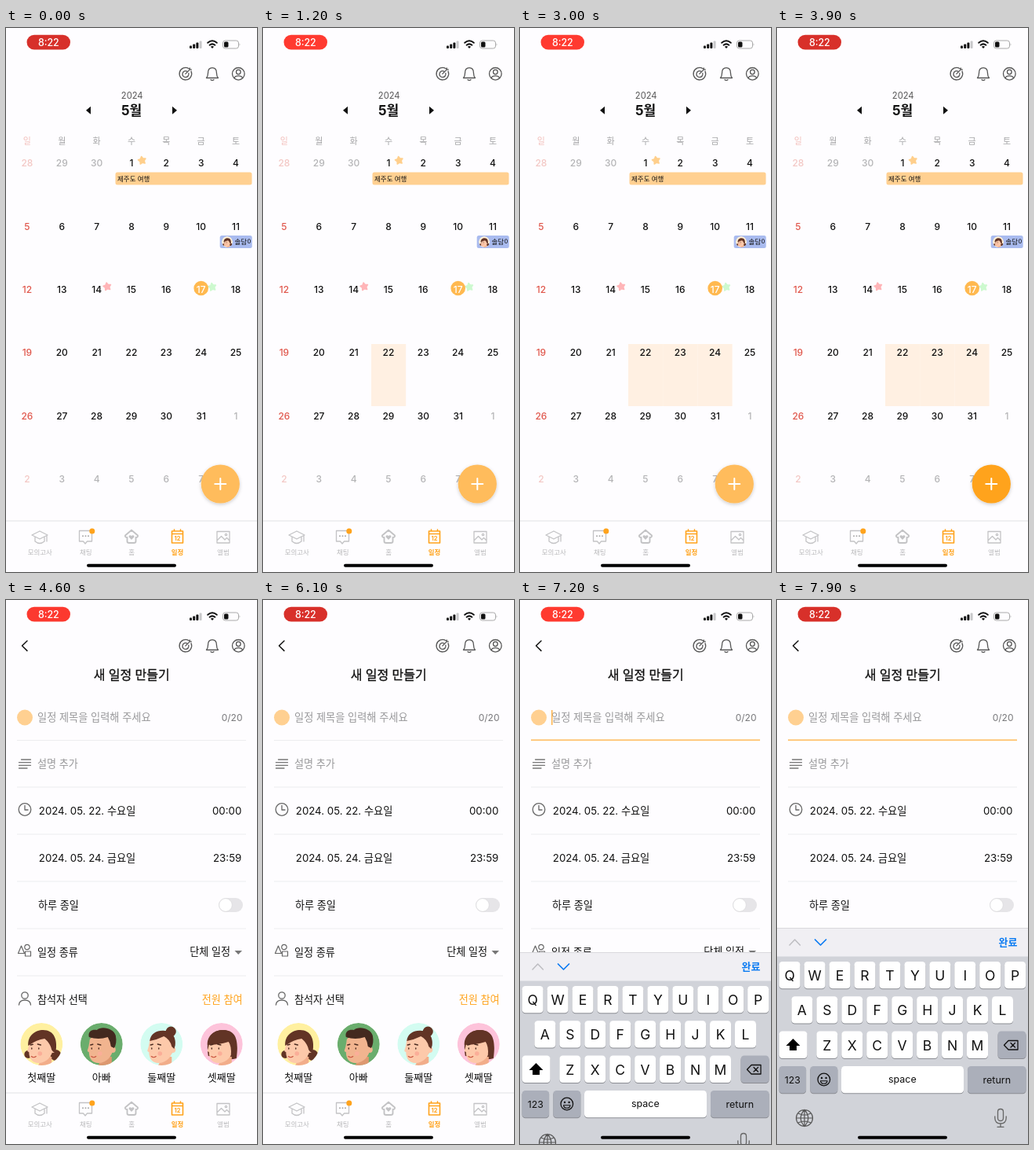
Animation, 320 px wide and 692 px high, one loop 8 s. Source, as an HTML page:

```html
<!DOCTYPE html>
<html lang="ko">
<head>
<meta charset="utf-8">
<style>
html, body { margin: 0; height: 100%; overflow: hidden; background: #fefdff; }
svg { display: block; width: 100vw; height: 100vh; font-family: Inter, "Noto Sans CJK KR", "Noto Sans CJK", sans-serif; }
.line { fill: none; stroke-linecap: round; stroke-linejoin: round; }
.title { stroke: #111; stroke-width: .3; }
</style>
</head>
<body>
<svg id="stage" viewBox="0 0 320 692"></svg>
<script>
const ORANGE = '#ffa31c', PEACH = '#ffd091', INK = '#111';

// y is the vertical centre of the glyphs
const text = (x, y, str, size, fill = INK, weight = 400, anchor = 'start') =>
  `<text x="${x}" y="${y + size * .37}" font-size="${size}" fill="${fill}" font-weight="${weight}" text-anchor="${anchor}">${str}</text>`;
const mid = (x, y, str, size, fill, weight) => text(x, y, str, size, fill, weight, 'middle');
const rect = (x, y, w, h, fill, r = 0, id = '') =>
  `<rect id="${id}" x="${x}" y="${y}" width="${w}" height="${h}" rx="${r}" fill="${fill}"/>`;
const dot = (x, y, r, fill) => `<circle cx="${x}" cy="${y}" r="${r}" fill="${fill}"/>`;
const line = (d, stroke = '#555', width = 1.3) =>
  `<path class="line" d="${d}" stroke="${stroke}" stroke-width="${width}"/>`;
const shape = (d, fill) => `<path d="${d}" fill="${fill}"/>`;
const ring = (x, y, r) => `M${x - r} ${y}a${r} ${r} 0 1 0 ${2 * r} 0a${r} ${r} 0 1 0 ${-2 * r} 0`;
const group = (id, body) => `<g id="${id}">${body}</g>`;
const times = (n, fn) => Array.from({ length: n }, (_, i) => fn(i)).join('');

function star(x, y, color) {
  const points = times(10, i => {
    const a = i * Math.PI / 5 - 1.75, r = i % 2 ? 2.7 : 5;
    return `${x + r * Math.cos(a)},${y + r * Math.sin(a)} `;
  });
  return `<polygon points="${points}" fill="${color}" stroke="${color}" stroke-width="1.6" stroke-linejoin="round"/>`;
}

function avatar(x, y, bg, style, scale = 1) {
  const man = style === 'man';
  const hair = man ? '#43291f' : '#623425', skin = man ? '#f1b48f' : '#fdc9aa', shade = man ? '#dd9870' : '#f2ad8a';
  const back = {
    tails: dot(-17, 13, 5, hair) + dot(18, 14, 7, hair),
    man: shape('M-14-8Q-10-20 4-19Q18-18 17 2L13 12H4z', hair),
    bun: dot(12, -16, 6.5, hair) + shape('M-8-10Q-4-18 5-17Q18-15 17 2Q16 10 11 13z', hair),
    bob: shape('M-17 15C-21-8-12-18 2-18C19-18 22-4 19 18Q10 21 0 17z', hair)
  }[style];
  const top = {
    tails: 'M-17 2C-18-11-8-18 2-18C16-18 21-6 18 11Q13 10 12 4Q10-2 4-7Q-6-6-17 2z',
    man: 'M-16-9C-18-18-10-19-6-18C0-24 16-20 18-11Q20-1 16 5L12 3Q11-4 8-9Q-4-5-16-9z',
    bun: 'M-15-4C-14-14-5-18 4-17C16-16 20-5 16 6L13 3Q11-6 3-10Q-5-6-15-4z',
    bob: 'M-18 2C-19-12-8-18 2-18C17-18 20-4 19 16L12 14Q13 3 9-3Q-4 1-18 1z'
  }[style];
  return `<g transform="translate(${x} ${y}) scale(${scale})" clip-path="url(#round)">` +
    dot(0, 0, 27, bg) + back +
    shape('M-2 16H13V29H-6Q-2 25-2 20z', shade) +
    shape('M-15-6Q-16 3-18 8Q-18 10-16 10C-16 19-11 24-4 24C6 24 14 16 15 4Q14-11 0-12Q-11-13-15-6z', skin) +
    dot(14, 7, 4, skin) + shape(top, hair) +
    dot(-2, 12, 2.8, '#fbae98') +
    line('M-12.5 5v1M-3.5 5v1M-14 1l3-.8M-5 0l4 1', '#4a2a20', 1.4) +
    line('M-13 15.5q3 2.5 6 0', '#c9543f', 1.1) + '</g>';
}

const pen = '#c3c3c5';

const statusBar =
  rect(26.5, 8.7, 55.5, 18.8, '#d7302a', 9.4, 'pill') + mid(54.3, 18, '8:22', 12.4, '#fff', 500) +
  times(4, i => rect(234 + i * 4.2, 22.5 - i * 2, 3, 3.5 + i * 2, i < 3 ? INK : '#c8c8ca', 1)) +
  line('M257.2 18.8Q263 13.8 268.8 18.8M259.6 21.7Q263 19 266.4 21.7', INK, 2) +
  shape('M260.9 23.7Q263 22.2 265.1 23.7L263 26z', INK) +
  `<rect x="276.5" y="16" width="20" height="10" rx="3" fill="none" stroke="#aaa"/>` +
  rect(278, 17.5, 5.5, 7, INK, 1.5) + shape('M297.6 19.2q1.8 1.8 0 3.6z', '#aaa');

const topIcons =
  line('M233.2 51.7A7.8 7.8 0 1 0 236 55M231 55.2A4 4 0 1 0 232.8 57.5M228.8 58.4L234.3 52.9V50.9M234.3 52.9H236.3') +
  line('M255.5 63.5H270.5Q268.5 61.5 268.5 57.5C268.5 53 266.5 50.7 263 50.7S257.5 53 257.5 57.5Q257.5 61.5 255.5 63.5zM261 65.8Q263 67.4 265 65.8') +
  line(ring(296.3, 58.3, 7.8) + ring(296.3, 56, 2.8) + 'M291.2 63.5Q292 60.8 296.3 60.8T301.4 63.5');

const dates = times(42, i => {
  const col = i % 7, row = i / 7 | 0, n = i - 2;
  const day = n < 1 ? n + 30 : n > 31 ? n - 31 : n, out = n < 1 || n > 31;
  const fill = n === 17 ? '#fff' : out ? (col ? '#b4b4b6' : '#f3c7c4') : col ? INK : '#e0574c';
  return mid(26.9 + col * 44.35, 172 + row * 80.35, day, 12, fill, 500);
});

const calendar =
  mid(160.7, 86, 2024, 11.2, '#555') + mid(160, 105, '5월', 17, INK, 700) +
  shape('M102 104.8L108 99.8V109.8zM218 104.8L212 99.8V109.8z', INK) +
  [...'일월화수목금토'].map((d, i) => mid(26.9 + i * 44.35, 144.3, d, 11, i ? '#a5a5a7' : '#f3c0bd')).join('') +
  times(3, i => rect(138 + i * 44.2, 402, 44.2, 79, '#fff0e2', 0, 'cell' + i)) +
  star(173.5, 168.5, '#ffcf8c') + star(129, 329, '#ffb5b8') + star(263, 329.5, '#cdf9cf') +
  dot(248.7, 331, 9.3, '#ffb950') + dates +
  rect(139.5, 183.5, 174, 16, PEACH, 2.5) + text(142, 191.7, '제주도 여행', 8.5, INK, 500) +
  rect(272.7, 264, 41, 16, '#a9bbef', 2.5) +
  avatar(282, 272, '#fff0d8', 'tails', .26) +
  `<g clip-path="url(#chip)">${text(291.5, 272.2, '솔담이', 8.5, INK, 500)}</g>` +
  `<circle id="fab" cx="273.3" cy="580" r="24.6" filter="url(#shadow)"/>` +
  line('M266.3 580H280.3M273.3 573V587', '#fff', 2);

const people = [['첫째딸', '#fff0a0', 'tails'], ['아빠', '#6aad6d', 'man'], ['둘째딸', '#d3fcf1', 'bun'], ['셋째딸', '#fdc3da', 'bob']];

const form =
  line('M27 52L20.5 58.3L27 64.6', INK, 1.5) +
  `<g class="title">${mid(160.3, 95, '새 일정 만들기', 16, INK, 500)}</g>` +
  times(6, i => rect(14, 178 + i * 60 - (i ? .5 : 0), 292, 1, '#ededef')) +
  dot(24, 149.5, 10, PEACH) + text(40, 149.5, '일정 제목을 입력해 주세요', 13.2, '#98989a') +
  text(301.5, 149.5, '0/20', 12, '#77777a', 400, 'end') +
  line('M19.5 203H31.5M16.5 206.7H31.5M16.5 210.4H31.5M16.5 214H27', '#777') + text(40, 208.5, '설명 추가', 13.1, '#98989a') +
  line(ring(24, 266.5, 7.8) + 'M24 261.5V267H28', '#666') +
  [['2024. 05. 22. 수요일', '00:00'], ['2024. 05. 24. 금요일', '23:59']].map(([day, hour], i) =>
    text(41.8, 268 + i * 60, day, 13.25) + text(300.3, 268 + i * 60, hour, 13.3, INK, 400, 'end')).join('') +
  text(41, 388, '하루 종일', 13.1) + rect(271, 379, 31, 18, '#e6e5e8', 9) +
  `<circle cx="280" cy="388" r="8.3" fill="#fff" stroke="#d5d5d7" stroke-width=".6"/>` +
  line('M19.5 440L23.5 449.5H15.5z' + ring(27, 441.5, 3.2) + 'M24.5 447H31.5V453H24.5z', '#666', 1.2) +
  text(40, 448, '일정 종류', 13.1) + text(286, 447.5, '단체 일정', 13.1, INK, 400, 'end') +
  shape('M291.5 446H301L296.2 451z', '#777') +
  line(ring(24, 503, 4.2) + 'M16.5 515Q17 509 24 509T31.5 515', '#666') +
  text(40, 508.5, '참석자 선택', 13.1) + text(301.5, 508.5, '전원 참여', 13.1, ORANGE, 400, 'end') +
  people.map(([name, bg, style], i) =>
    avatar(45.3 + i * 76.5, 565, bg, style) + mid(45.3 + i * 76.5, 607.5, name, 13)).join('') +
  group('focus', rect(14, 177.3, 292, 1.8, '#ffc470') + rect(40, 140, 1.5, 19, '#ffb54d', 0, 'caret'));

const tabs =
  rect(0, 627, 320, 65, '#fefdff') + rect(0, 626.5, 320, 1, '#e2e1e4') +
  line('M33 645L43 640L53 645L43 650zM37 647.3V653Q43 658 49 653V647.3M52 646V653', pen) +
  line('M93.5 639.5H109.5V653H103.5L101 656L98.5 653H93.5z', pen) +
  times(3, i => dot(98 + i * 3.5, 646.3, 1, '#aaa')) + dot(109.8, 640, 3.5, ORANGE) +
  line('M160 638.7L168 645.5Q168.5 648 165.5 648V653Q165.5 655 163 655H157Q154.5 655 154.5 653V648Q151.5 648 152 645.5z', pen, 1.9) +
  shape('M160 651L156.8 647.8Q156 645.3 158.2 645.2Q159.5 645.2 160 646.4Q160.5 645.2 161.8 645.2Q164 645.3 163.2 647.8z', pen) +
  line('M211.5 640H225.5V655H211.5zM211.5 643.5H225.5M214.5 638V640M222.5 638V640', ORANGE, 1.6) +
  mid(218.5, 649.6, 12, 7.5, ORANGE, 700) +
  line('M269 640.5H285V655H269zM269 652L274.5 646.5L279 651L281.5 648.5L285 652' + ring(280.5, 644.5, 1.2), pen) +
  ['모의고사', '채팅', '홈', '일정', '앨범'].map((s, i) =>
    mid(43.3 + i * 58.4, 667.3, s, 8.5, i === 3 ? ORANGE : '#b9b9bb', i === 3 ? 700 : 400)).join('');

const key = (x, y, w, fill = '#fff') => rect(x, y + 1, w, 34.3, '#8b8d93', 4.3) + rect(x, y, w, 34.3, fill, 4.3);
const GREY = '#abafba', PITCH = 31.95;
const letters = [['QWERTYUIOP', 2.6, 460], ['ASDFGHJKL', 18.4, 504.3], ['ZXCVBNM', 50.3, 548.6]].map(([row, x, y]) =>
  [...row].map((c, i) => key(x + i * PITCH, y, 27) + mid(x + 13.5 + i * PITCH, y + 17.5, c, 17.5)).join('')).join('');

const keyboard =
  rect(0, 417, 320, 37, '#f0eff3') + rect(0, 417, 320, .7, '#d0d0d4') + rect(0, 453.5, 320, 239, '#d1d3d9') +
  line('M16 439L22.7 432L29.4 439', '#bdbdc1', 1.5) + line('M48.5 432L55.5 439L62.5 432', '#0a7bf2', 1.7) +
  text(306.5, 435, '완료', 13, '#0a7bf2', 700, 'end') + letters +
  key(2.6, 548.6, 36) + shape('M20.5 558L29.5 567H25V573H16V567H11.5z', '#000') +
  key(281.5, 548.6, 36, GREY) + line('M295 560.5H307V572H295L289.5 566.2zM298 563.5L303.5 569M303.5 563.5L298 569', INK) +
  key(2.6, 593, 34.5, GREY) + mid(19.8, 610, '123', 12.3) +
  key(42.3, 593, 35, GREY) + line(ring(59.8, 610, 7.8), INK) + dot(57, 608, 1.2, INK) + dot(62.6, 608, 1.2, INK) +
  line('M55.5 611.8H64.1Q63.5 615.3 59.8 615.3T55.5 611.8z', INK, 1.1) +
  key(82, 593, 156) + mid(159.8, 609.5, 'space', 12.5) + key(243, 593, 74.5, GREY) + mid(280.3, 610, 'return', 12.5) +
  line(ring(35, 659, 10.5) + 'M35 648.5V669.5M24.5 659H45.5M27 653Q35 657 43 653M27 665Q35 661 43 665M35 648.5Q25.5 659 35 669.5M35 648.5Q44.5 659 35 669.5', '#555', 1.2) +
  line('M281.5 651Q281.5 647.5 285 647.5T288.5 651V659Q288.5 662.5 285 662.5T281.5 659zM277.8 657V659Q278 666 285 666T292.2 659V657M285 666V670M281 670.3H289', '#666');

const $ = id => document.getElementById(id);
$('stage').innerHTML =
  `<defs><clipPath id="round"><circle r="27"/></clipPath>
  <clipPath id="chip"><rect x="290" y="264" width="23" height="16"/></clipPath>
  <filter id="shadow" x="-30%" y="-30%" width="160%" height="160%"><feDropShadow dx="0" dy="1.5" stdDeviation="2" flood-opacity=".2"/></filter></defs>` +
  rect(0, 0, 320, 692, '#fefdff') + statusBar + topIcons +
  group('calendar', calendar) + group('form', form) + tabs + group('keyboard', keyboard) +
  rect(103, 681.8, 114, 4, '#000', 2);

const show = (id, on) => $(id).setAttribute('visibility', on ? 'inherit' : 'hidden');
const CELL_TIMES = [1200, 1700, 1900];

function draw() {
  const t = Math.floor(performance.now() % 8000 / 100) * 100;
  const glow = Math.min(1, .7 * (1 - Math.cos(t * Math.PI / 1000)));
  $('pill').setAttribute('fill', `rgb(${215 + 40 * glow},${48 + 10 * glow},${42 + 6 * glow})`);

  show('calendar', t < 4200);
  show('form', t >= 4200);
  CELL_TIMES.forEach((start, i) => show('cell' + i, t >= start && t < 4200));
  $('fab').setAttribute('fill', t >= 3800 ? ORANGE : '#ffbc5b');

  show('focus', t >= 6900);
  show('caret', t >= 6900 && t < 7500);
  // critically damped spring
  const s = Math.max(0, t - 6995) / 1000 * 18.26;
  $('keyboard').setAttribute('transform', `translate(0 ${276 * (1 + s) * Math.exp(-s)})`);
  requestAnimationFrame(draw);
}
draw();
</script>
</body>
</html>
```
